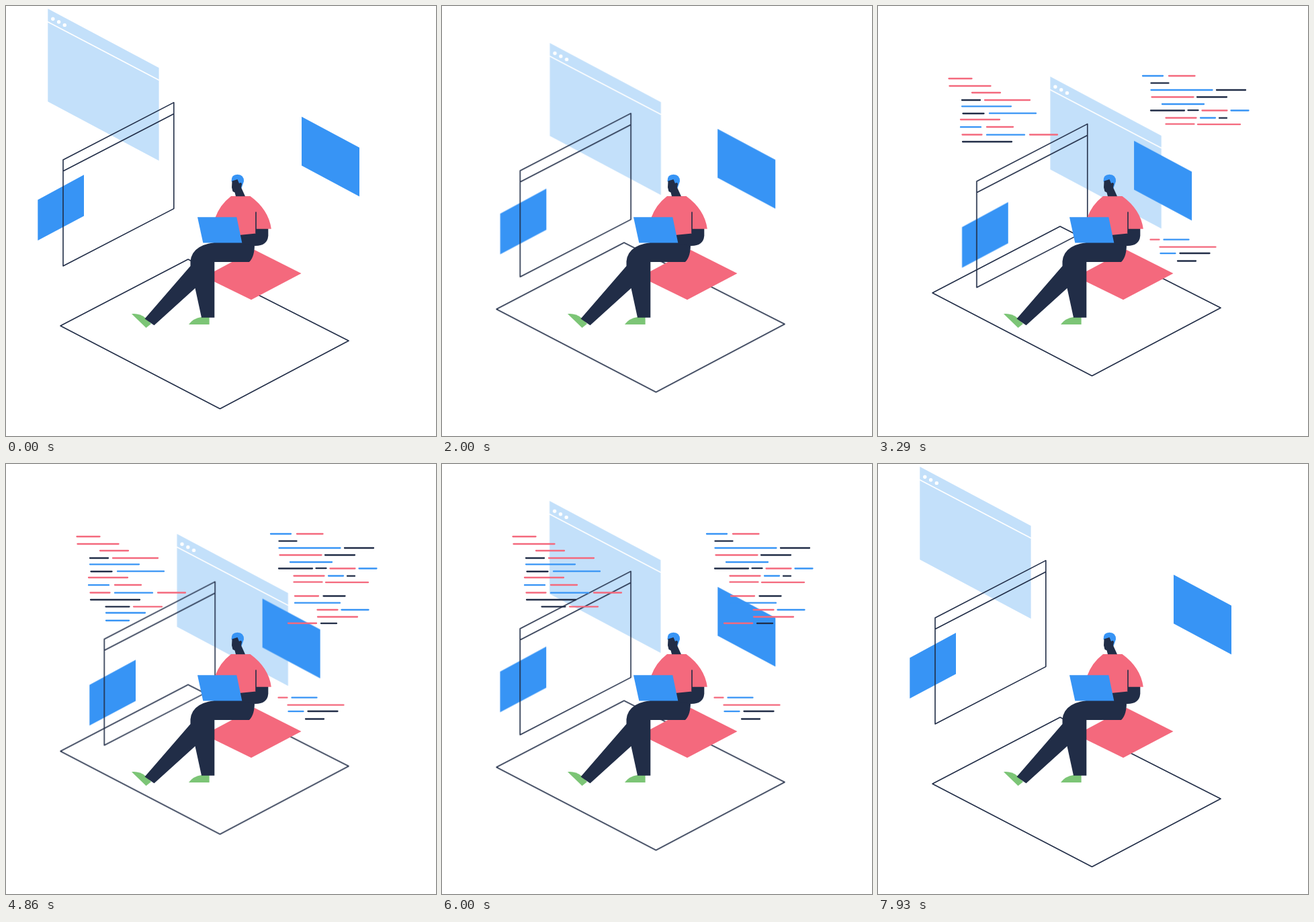
Animation, 640 px wide and 640 px high, one loop 8000 ms. Source, as an HTML page without scripts:

```html
<!DOCTYPE html>
<html lang="en">
<head>
<meta charset="utf-8">
<title>Working among windows</title>
<style>
  html, body { margin: 0; width: 100%; height: 100%; overflow: hidden; background: #fff; }
  svg { position: absolute; left: 0; top: 0; width: 640px; height: 640px; }

  .navy { fill: #212d47; }
  .blue { fill: #3794f5; }
  .pale { fill: #c3e0fa; }
  .red { fill: #f4697d; }
  .green { fill: #7cc576; }
  .line { fill: none; stroke: #212d47; stroke-width: 1.6; stroke-linejoin: round; stroke-linecap: round; }
  .white { fill: none; stroke: #fff; stroke-width: 1.7; }

  /* every floating part slides by (--x, --y) and back */
  .slide { animation: slide 8s infinite; }
  @keyframes slide {
    0%, 100% { transform: translate(0, 0); animation-timing-function: cubic-bezier(.5, 0, .75, 0); }
    25% { transform: translate(calc(var(--x) * .5), calc(var(--y) * .5)); animation-timing-function: cubic-bezier(.25, 1, .5, 1); }
    50% { transform: translate(var(--x), var(--y)); animation-timing-function: cubic-bezier(.5, 0, .75, 0); }
    75% { transform: translate(calc(var(--x) * .5), calc(var(--y) * .5)); animation-timing-function: cubic-bezier(.25, 1, .5, 1); }
  }
  .floor { --x: 0px; --y: -49.5px; }
  .browser { --x: 196px; --y: 102px; }
  .frame { --x: 62.5px; --y: 32.2px; }
  .card-l { --x: 78.5px; --y: 41px; }
  .card-r { --x: -59.5px; --y: 36.2px; }

  /* code blocks are revealed and removed row by row */
  .code path { fill: none; stroke-width: 2.3; stroke-linecap: round; }
  .code .n { stroke: #212d47; }
  .code .b { stroke: #3794f5; }
  .code .r { stroke: #f4697d; }
  .left { animation: left 8s infinite; }
  .right { animation: right 8s infinite; }
  .low { animation: low 8s infinite; }
  @keyframes left {
    0%, 28.81%, 95.19%, 100% { clip-path: inset(0 0 537.5px 0); animation-timing-function: steps(13); }
    44.25%, 70% { clip-path: inset(0 0 402.9px 0); animation-timing-function: steps(13); }
  }
  @keyframes right {
    0%, 30.63%, 97.38%, 100% { clip-path: inset(0 0 541.1px 0); animation-timing-function: steps(14); }
    48.13%, 73.75% { clip-path: inset(0 0 397.6px 0); animation-timing-function: steps(14); }
  }
  @keyframes low {
    0%, 33.75%, 98.13%, 100% { clip-path: inset(0 0 298px 0); animation-timing-function: steps(4); }
    39.75%, 90.63% { clip-path: inset(0 0 255.6px 0); animation-timing-function: steps(4); }
  }
</style>
</head>
<body>
<svg viewBox="0 0 640 640">
  <path class="slide floor line" d="M271 377 510 498.3 318.5 599.5 81 476Z"/>

  <g class="slide browser">
    <path class="pale" d="M62.3 4 227.6 92V230.3L62.3 142.3Z"/>
    <path class="white" d="M62 23.5 228 110.5"/>
    <g fill="#fff">
      <circle cx="69.8" cy="19.2" r="2.7"/>
      <circle cx="78.6" cy="23.8" r="2.7"/>
      <circle cx="87.3" cy="28.4" r="2.7"/>
    </g>
  </g>

  <path class="slide card-l blue" d="M47.3 288.5 116 251.3V312.6L47.3 349Z"/>
  <path class="slide frame line" d="M85 229 249.8 143.6V301.6L85 387ZM85 245.7 249.8 160.5"/>
  <path class="slide card-r blue" d="M440 164.8 526 210.7V283.5L440 237.6Z"/>

  <path class="red" d="M370 363 439.5 398 365 437.3 295 403Z"/>

  <g class="person">
    <path class="green" d="M187 458.3Q198 457 208 464.5L216 473 208.5 479Z"/>
    <path class="green" d="M272 474Q279 464.5 291 463H302.6V474Z"/>
    <path class="navy" d="M310 352H370Q370.5 373 362 381H310.3V463.8H291L281.5 420 220.5 475.3 206.5 465.5 274.5 387Q272 357 310 352Z"/>
    <path class="navy" d="M371 331H390.3V342Q389 357 371 357L350 354 347 340Z"/>
    <path class="red" d="M335 283H363.5Q391 303 394.8 331.8H372V338.6L347 341 311 316Q318 296 335 283Z"/>
    <path class="line" d="M372 307V338"/>
    <path class="blue" d="M335.5 261Q335 250.8 344.5 250.8 354.2 251 354 261L350.5 271 345 268Z"/>
    <path class="navy" d="M336.5 260.5 344.5 258 347 264Q350.5 261.5 351 265L350 270 356 283.3H342L340.5 277.5 337.5 276 336 270Z"/>
    <path class="blue" d="M285 314.3H343.3L351.3 352.6H293.3Z"/>
  </g>
</svg>

<svg class="code left" viewBox="0 0 640 640">
  <path class="r" d="M105.5 108h34M106.5 119h61M140 129h42M159 140h67M123 169h58M162 180h39M125.5 191.5h29M226 191.5h41M190 212.3h42"/>
  <path class="b" d="M125 149.3h73M166 159.7h69M123 180.2h30M162 191.7h56M149 221.5h58M149 233h34"/>
  <path class="n" d="M125 140h27M126.5 160h31M126 202h73M148.5 212.3h35"/>
</svg>

<svg class="code right" viewBox="0 0 640 640">
  <path class="r" d="M433 104h38.5M407.5 135.5h62M482.5 155.5h37M428.5 166.5h45M428.5 175.7h42M476 176.2h63M430 196.5h35M463.5 217h30M464 227.5h59M420 237h42"/>
  <path class="b" d="M394 104h30M406.5 125h91M423 146h62M525.5 155.5h26M480 166.5h22M430 206.7h67M499.5 217h40"/>
  <path class="n" d="M406.5 114.7h26M504 125h43M475 135.5h44M406 155.5h50M461.5 155.2h15M508 166.7h11M472.5 196.5h32M469 237.2h23"/>
</svg>

<svg class="code low" viewBox="0 0 640 640">
  <path class="r" d="M405.5 347.7h13M419.5 358.7h83"/>
  <path class="b" d="M425.5 347.7h37M420.5 368.2h22"/>
  <path class="n" d="M449.5 368h44M446 379.5h27"/>
</svg>
</body>
</html>
```
